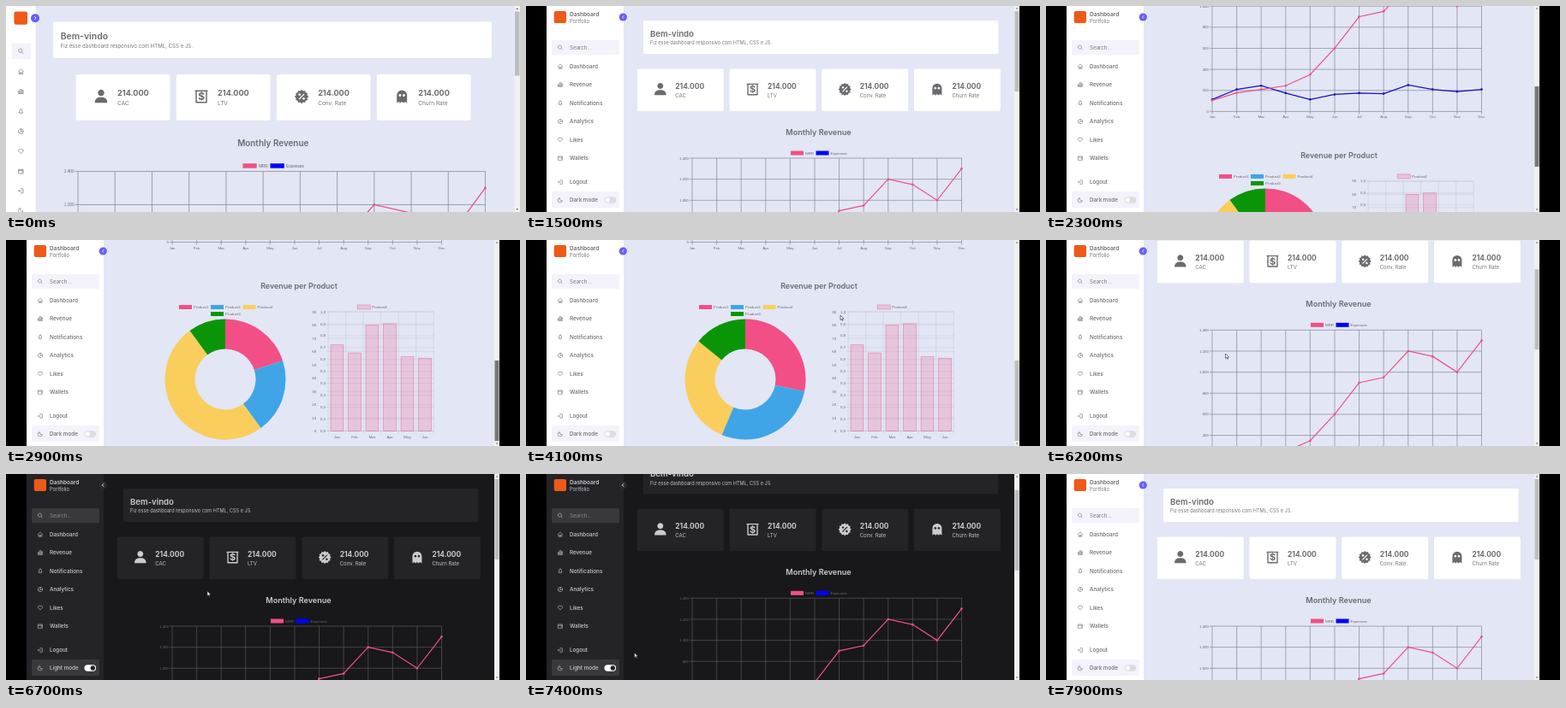
Animation, 600 px wide and 241 px high, one loop 8000 ms. Source, as an HTML page with a canvas:

```html
<!DOCTYPE html>
<html lang="pt">
<head>
<meta charset="utf-8">
<title>Dashboard</title>
<style>
html, body { margin: 0; width: 100%; height: 100%; overflow: hidden; background: #000; }
canvas { display: block; width: 600px; height: 241px; }
</style>
</head>
<body>
<canvas id="stage"></canvas>
<script>
const LOOP = 8000, W = 600, H = 241, ZOOM = 1 / 0.92;
const UI = 'Inter, "Open Sans", sans-serif';
const CHART = '"Liberation Sans", Arial, sans-serif';
const PINK = '#f14f86', BLUE = '#3fa5e6', YELLOW = '#face5c', GREEN = '#0a9508';

const canvas = document.getElementById('stage');
const c = canvas.getContext('2d');
const dpr = window.devicePixelRatio || 1;
canvas.width = W * dpr;
canvas.height = H * dpr;

// light and dark value of each colour
const THEME = {
  page: ['#e2e6f5', '#18171a'], panel: ['#ffffff', '#242327'], soft: ['#f4f3fc', '#39383c'],
  text: ['#6b6b6f', '#cccccc'], muted: ['#77777b', '#c4c4c6'], hint: ['#77777b', '#8a8a8d'],
  grid: ['#85889a', '#58575b'], knob: ['#ffffff', '#242327'], rail: ['#dcdce0', '#ffffff'],
  button: ['#695cfe', '#2b2a2e']
};

const MONTHS = 'Jan Feb Mar Apr May Jun Jul Aug Sep Oct Nov Dec'.split(' ');
const MRR = [106, 177, 210, 245, 350, 600, 900, 950, 1200, 1150, 1000, 1300];
const COSTS = [114, 210, 245, 175, 114, 162, 175, 169, 251, 210, 189, 210];
const SALES = [65, 59, 80, 81, 56, 55];

const ICONS = {
  search: 'M10 3a7 7 0 1 0 .01 0M15 15l6 6',
  home: 'M3 12L12 3l9 9M5 11v10h14V11M10 21v-6h4v6',
  bars: 'M3 11h5v9H3zM9 4h6v16H9zM16 8h5v12h-5z',
  bell: 'M5 18h14l-2-4v-4a5 5 0 0 0-10 0v4zM10 21h4M12 5V2',
  pie: 'M12 3a9 9 0 1 0 .01 0M12 3v9h9M12 12l-6 6',
  heart: 'M12 20l-8-8a5 5 0 0 1 8-6a5 5 0 0 1 8 6z',
  wallet: 'M3 5h17v15H3zM3 9h18M15 14h5',
  exit: 'M10 4h10v16H10M15 12H3M7 8l-4 4l4 4',
  moon: 'M20 14A9 9 0 1 1 11 4A7 7 0 0 0 20 14z',
  user: 'M12 2a4.6 4.6 0 1 0 .01 0zM3 21v-1a7 7 0 0 1 7-7h4a7 7 0 0 1 7 7v1z',
  bill: 'M2 3h20M4 3v18h16V3',
  ghost: 'M12 2a8 8 0 0 0-8 8v12l3-2 2.500 2 2.500-2 2.500 2 2.500-2 3 2V10a8 8 0 0 0-8-8z' +
    'M9 8a2 2 0 1 0 .01 0zM15 8a2 2 0 1 0 .01 0z'
};
for (const k in ICONS) ICONS[k] = new Path2D(ICONS[k]);

const MENU = [
  ['home', 'Dashboard', 70.5], ['bars', 'Revenue', 92], ['bell', 'Notifications', 113.3],
  ['pie', 'Analytics', 135], ['heart', 'Likes', 156.5], ['wallet', 'Wallets', 178]
];
const CARDS = ['CAC', 'LTV', 'Conv. Rate', 'Churn Rate'];

// time, then values; eased between neighbours
const OPEN = [[0, 0], [150, 0], [700, 1], [950, 1], [1300, 0], [1499, 0], [1500, 1]];
const SCROLL = [[1540, 0], [2800, 348], [4450, 348], [5030, 141], [5960, 141], [6450, 0],
  [6800, 0], [7120, 141], [7180, 141], [7500, 0]];
const POINTER = [[3000, 572, 185], [3350, 291, 78], [4000, 293, 78], [4100, 367, 88], [4300, 418, 78],
  [4500, 440, 120], [5000, 430, 70], [5180, 317, 29], [5330, 317, 29], [5500, 337, 6], [5720, 317, 29],
  [5900, 320, 40], [6500, 99, 226], [6690, 99, 226], [6700, 235, 137], [7150, 238, 141],
  [7500, 99, 226], [7800, 99, 228]];

const lerp = (a, b, p) => a + (b - a) * p;
const span = (t, a, b) => Math.min(1, Math.max(0, (t - a) / (b - a)));
const smooth = p => p * p * (3 - 2 * p);
const outQuart = p => 1 - (1 - p) ** 4;

function track(keys, t) {
  let i = 0;
  while (i < keys.length - 1 && t >= keys[i + 1][0]) i++;
  const a = keys[i], b = keys[i + 1] || a;
  const p = a === b ? 0 : smooth(span(t, a[0], b[0]));
  return a.slice(1).map((v, j) => lerp(v, b[j + 1], p));
}

function mix(pair, p) {
  const ch = (s, i) => parseInt(s.slice(i, i + 2), 16);
  return `rgb(${[1, 3, 5].map(i => Math.round(lerp(ch(pair[0], i), ch(pair[1], i), p)))})`;
}

function box(x, y, w, h, color, r = 0) {
  c.fillStyle = color;
  c.beginPath();
  c.roundRect(x, y, w, h, r);
  c.fill();
}

function disc(x, y, r, color) {
  c.fillStyle = color;
  c.beginPath();
  c.arc(x, y, r, 0, Math.PI * 2);
  c.fill();
}

function line(pts, color, width) {
  c.strokeStyle = color;
  c.lineWidth = width;
  c.beginPath();
  pts.forEach(([x, y]) => c.lineTo(x, y));
  c.stroke();
}

function text(s, x, y, size, color, weight = 400, align = 'left', family = UI) {
  c.font = `${weight} ${size}px ${family}`;
  c.textAlign = align;
  c.textBaseline = 'alphabetic';
  c.fillStyle = color;
  c.fillText(s, x, y + size * 0.36);
}

const label = (s, x, y, align = 'left', color = '#68686c') => text(s, x, y, 4.4, color, 400, align, CHART);

function icon(name, x, y, size, color, solid) {
  c.save();
  c.translate(x - size / 2, y - size / 2);
  c.scale(size / 24, size / 24);
  c.lineWidth = 2;
  c.lineJoin = 'round';
  c.fillStyle = c.strokeStyle = color;
  if (solid) c.fill(ICONS[name], 'evenodd');
  else c.stroke(ICONS[name]);
  c.restore();
}

function legend(x, y, s, color, struck) {
  box(x, y - 2.5, 15, 5, color);
  label(s, x + 17, y);
  if (struck) line([[x + 16.5, y], [x + 27, y]], '#68686c', 0.6);
}

function cardIcon(i, x, y, col) {
  if (i === 0) return icon('user', x, y, 18, col.text, true);
  if (i === 3) return icon('ghost', x, y, 16.5, col.text, true);
  if (i === 1) {
    icon('bill', x, y, 16.5, col.text);
    return text('$', x, y, 11, col.text, 700, 'center');
  }
  c.fillStyle = col.text;
  c.beginPath();
  for (let k = 0; k < 24; k++) {
    const r = k % 2 ? 6.1 : 7.5, a = k * Math.PI / 12;
    c.lineTo(x + r * Math.cos(a), y + r * Math.sin(a));
  }
  c.fill();
  disc(x - 2.2, y - 2.2, 1.2, col.panel);
  disc(x + 2.2, y + 2.2, 1.2, col.panel);
  line([[x - 2.8, y + 2.8], [x + 2.8, y - 2.8]], col.panel, 1.1);
}

function lineChart(t, open, mid, col) {
  const hidden = t >= 5200 && t < 5740;
  const top = 178, h = lerp(251, 172.5, open), bottom = top + h;
  const x0 = lerp(77.3, 170, open) - (hidden ? 3 : 0), x1 = lerp(514.7, 484.5, open);
  const step = (x1 - x0) / 11;
  text('Monthly Revenue', mid, 147.5, 9.1, col.text, 600, 'center');
  legend(mid - 32.5, 172, 'MRR', PINK, hidden);
  legend(mid - 3, 172, 'Expenses', '#0000ff');

  const rows = hidden ? 5 : 7;
  for (let i = 0; i <= rows; i++) {
    const y = bottom - h * i / rows;
    line([[x0 - 3, y], [x1, y]], col.grid, 0.7);
    const v = hidden ? 100 + i * 50 : i * 200;
    label(v >= 1000 ? `1.${String(v - 1000).padStart(3, '0')}` : v, x0 - 4, y, 'right');
  }
  MONTHS.forEach((m, i) => {
    const x = x0 + step * i;
    line([[x, top], [x, bottom + 3]], col.grid, 0.7);
    label(m, x, bottom + 6.5, 'center');
  });

  const zoom = t < 5740 ? outQuart(span(t, 5200, 5480)) : 1 - outQuart(span(t, 5740, 6020));
  const fade = t < 5740 ? 1 - span(t, 5200, 5720) : span(t, 5740, 6000);
  const place = (v, i) => [x0 + step * i, bottom - h * lerp(v / 1400, (v - 100) / 250, zoom)];
  const series = (data, color) => {
    const pts = data.map(place);
    line(pts, color, 1.2);
    pts.forEach(([x, y]) => disc(x, y, 1.3, color));
  };
  c.save();
  c.beginPath();
  c.rect(x0 - 2, top - 1, x1 - x0 + 4, h + 2);
  c.clip();
  series(COSTS, '#1a0cc8');
  c.globalAlpha = fade;
  series(MRR, PINK);
  c.restore();
}

function doughnut(t, x, y) {
  const off = t < 4020 ? outQuart(span(t, 3480, 3880)) : 1 - outQuart(span(t, 4020, 4420));
  const struck = t >= 3480 && t < 4020;
  legend(x - 54, y - 84.5, 'Product1', PINK);
  legend(x - 17, y - 84.5, 'Product2', BLUE);
  legend(x + 20.5, y - 84.5, 'Product4', YELLOW);
  if (struck) line([[x + 37, y - 84.5], [x + 56, y - 84.5]], '#68686c', 0.6);
  legend(x - 17, y - 76.5, 'Product3', GREEN);
  let a = -Math.PI / 2;
  [[PINK, 0.2, 0.4], [BLUE, 0.2, 0.4], [YELLOW, 0.5, 0], [GREEN, 0.1, 0.2]].forEach(([color, on, alone]) => {
    const b = a + lerp(on, alone, off) * Math.PI * 2;
    c.fillStyle = color;
    c.beginPath();
    c.arc(x, y, 70.5, a, b);
    c.arc(x, y, 35.5, b, a, true);
    c.fill();
    a = b;
  });
}

function barChart(x, top, dark) {
  const h = 139.5, w = 123, bottom = top + h, step = w / 6;
  const faint = dark > 0.5 ? 'rgba(255,255,255,.1)' : 'rgba(70,75,110,.15)';
  const framed = (bx, by, bw, bh) => {
    box(bx, by, bw, bh, 'rgba(241,79,134,.22)');
    c.strokeStyle = 'rgba(235,75,130,.65)';
    c.lineWidth = 0.6;
    c.strokeRect(bx, by, bw, bh);
  };
  framed(x + 34, top - 8, 15, 5);
  label('Product4', x + 51, top - 5.5);
  for (let i = 0; i <= 9; i++) {
    const y = bottom - h * i / 9;
    line([[x - 2, y], [x + w, y]], faint, 0.6);
    label(i * 10, x - 14, y, 'right');
  }
  for (let i = 0; i <= 10; i++) {
    const y = bottom - h * i / 10;
    line([[x - 2, y], [x + w, y]], faint, 0.6);
    label((i / 10).toFixed(1).replace('.', ','), x - 3, y, 'right');
  }
  for (let i = 0; i <= 6; i++) line([[x + step * i, top], [x + step * i, bottom + 3]], faint, 0.6);
  SALES.forEach((v, i) => {
    const m = x + step * (i + 0.5), bh = h * v / 90;
    framed(m - 7.4, bottom - bh, 14.8, bh);
    label(MONTHS[i], m, bottom + 6.5, 'center');
  });
}

function content(t, open, dark, col) {
  const mid = lerp(286.8, 317.5, open);
  const bx = lerp(50.6, 113, open), bw = lerp(471, 414.5, open);
  box(bx, 17, bw, 39, col.panel, 1.5);
  text('Bem-vindo', bx + 8, 32.3, 9.6, col.text, 600);
  text('Fiz esse dashboard responsivo com HTML, CSS e JS.', bx + 8, 43.4, 5.6, col.muted);
  CARDS.forEach((name, i) => {
    const x = mid - 211.7 + i * 107.7;
    box(x, 73.5, 101, 49.5, col.panel, 2);
    cardIcon(i, x + 27, 97.5, col);
    text('214.000', x + 44.5, 93.5, 8.4, col.text, 700);
    text(name, x + 44.5, 104.7, 6, col.muted);
  });
  lineChart(t, open, mid, col);
  const drop = lerp(78.5, 0, open);
  text('Revenue per Product', mid + 0.5, 401.5 + drop, 8.9, col.text, 600, 'center');
  doughnut(t, mid - 85.5, 511 + drop);
  barChart(mid + 34.7, 432 + drop, dark);
}

function sidebar(open, dark, col, vh, wide) {
  const w = lerp(32, 90, open), inner = w - 11;
  const exitY = wide ? 199 : 206, modeY = exitY + 21;
  c.save();
  c.beginPath();
  c.rect(0, 0, w, vh);
  c.clip();
  box(0, 0, w, vh, col.panel);
  box(8.7, 6, 14.3, 14, '#ee5a17', 2);
  box(6, 40, inner, 17.3, col.soft, 1.5);
  if (!wide) box(6, modeY - 10, inner, 19, col.soft, 1.5);
  const small = (name, y) => icon(name, 16, y, 7, col.text);
  small('search', 48.6);
  MENU.forEach(([name, , y]) => small(name, y));
  small('exit', exitY);
  small('moon', modeY);
  c.globalAlpha = open;
  text('Dashboard', 27, 9.3, 6.5, col.text, 600);
  text('Portfolio', 27, 17.6, 5.8, col.muted);
  text('Search...', 27, 49, 6.2, col.hint);
  MENU.forEach(([, s, y]) => text(s, 27, y, 6.3, col.text, 500));
  text('Logout', 27, exitY, 6.3, col.text, 500);
  text(dark > 0.5 ? 'Light mode' : 'Dark mode', 27, modeY, 6.3, col.text, 500);
  box(67.5, modeY - 3.7, 13.6, 7.4, col.rail, 3.7);
  disc(lerp(71.4, 77.3, dark), modeY, 2.7, col.knob);
  c.restore();

  const bx = w - 0.7, dir = open > 0.5 ? 1 : -1;
  disc(bx, 13, 4.6, col.button);
  line([[bx + 0.8 * dir, 11.2], [bx - 0.9 * dir, 13], [bx + 0.8 * dir, 14.8]], '#fff', 0.8);
}

function scrollbar(t, open, scroll, vh, wide) {
  box(546, 0, 6, vh, '#f1f1f1');
  const len = wide ? lerp(69, 79, open) : 94;
  const drag = t >= 1540 && t < 3000;
  box(546.5, 6 + scroll * 135 / 348, 5, len, drag ? '#787878' : '#bdbdbf');
  const arrow = (y, d) => {
    c.fillStyle = '#606060';
    c.beginPath();
    c.moveTo(547.7, y);
    c.lineTo(550.3, y);
    c.lineTo(549, y - 1.5 * d);
    c.fill();
  };
  arrow(3.6, 1);
  arrow(vh - 3.6, -1);
}

function pointer(t) {
  if (t < 3000 || t > 7800) return;
  const [x, y] = track(POINTER, t);
  if (x > 568) return;
  c.save();
  c.translate(x, y);
  c.beginPath();
  [[0, 0], [0, 5.6], [1.3, 4.4], [2.2, 6.4], [3.1, 6], [2.2, 4.1], [4, 4]].forEach(p => c.lineTo(...p));
  c.closePath();
  c.fillStyle = '#fff';
  c.fill();
  c.strokeStyle = '#222';
  c.lineWidth = 0.6;
  c.stroke();
  c.restore();
}

function draw(t) {
  const wide = t < 1500, k = wide ? ZOOM : 1, vh = H / k;
  const [open] = track(OPEN, t), [scroll] = track(SCROLL, t);
  const dark = t < 6690 ? 0 : 1 - span(t, 7560, 7760);
  const col = {};
  for (const key in THEME) col[key] = mix(THEME[key], dark);

  c.setTransform(dpr, 0, 0, dpr, 0, 0);
  box(0, 0, W, H, '#000');
  c.save();
  c.translate(wide ? 0 : 24, 0);
  c.scale(k, k);
  c.beginPath();
  c.rect(0, 0, 552, vh);
  c.clip();
  box(0, 0, 552, vh, col.page);
  c.save();
  c.translate(0, -scroll);
  content(t, open, dark, col);
  c.restore();
  sidebar(open, dark, col, vh, wide);
  scrollbar(t, open, scroll, vh, wide);
  c.restore();
  pointer(t);
}

let start;
function tick(now) {
  start ??= now;
  draw((now - start) % LOOP);
  requestAnimationFrame(tick);
}
draw(0);
requestAnimationFrame(tick);
</script>
</body>
</html>
```
